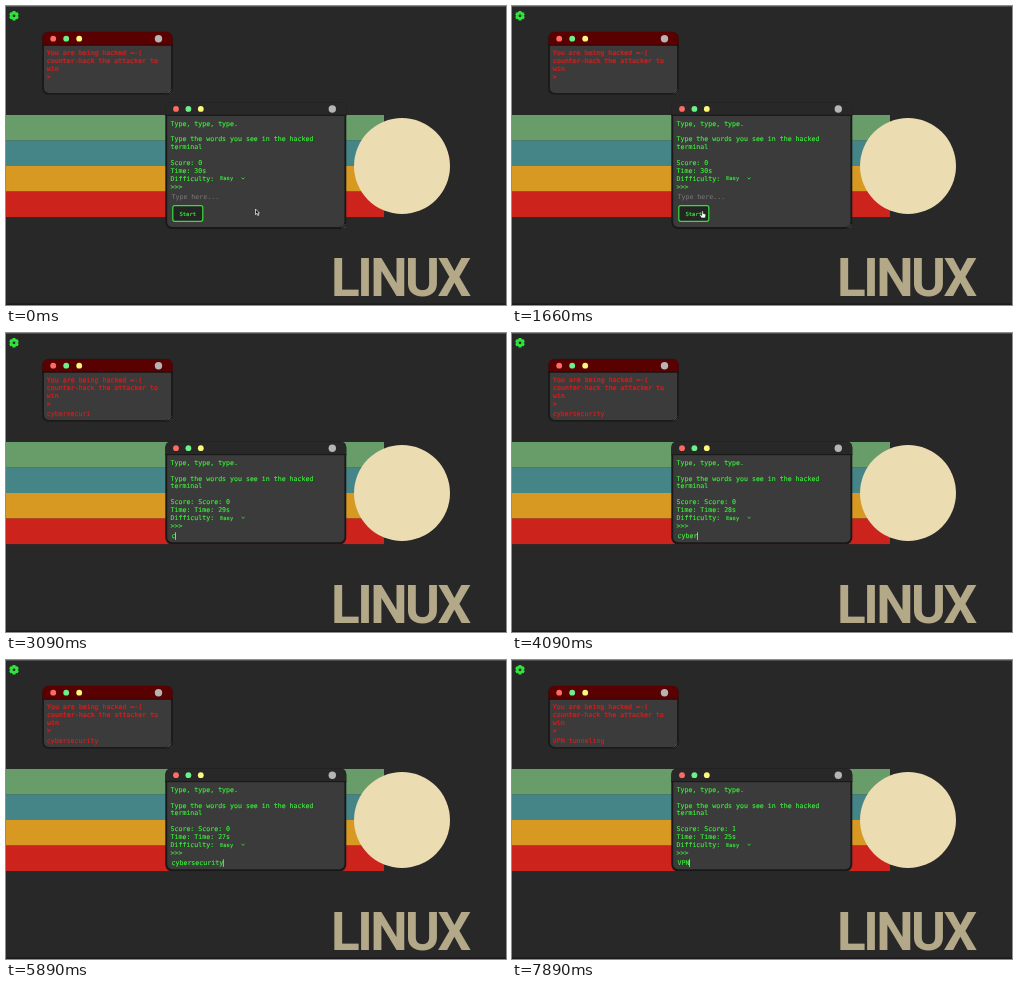
An HTML page for the animation above (8000 ms loop, 500 by 299 pixels).

```html
<!DOCTYPE html>
<html lang="en">
<head>
<meta charset="utf-8">
<title>Typing game</title>
<style>
  html, body { margin: 0; width: 100%; height: 100%; overflow: hidden; background: #282828; }
  svg { display: block; width: 100%; height: 100%; }
  text { font-family: "DejaVu Sans Mono", monospace; font-size: 6.6px; white-space: pre; }
  .green text { fill: #3bf53b; stroke: #3bf53b; stroke-width: .12; }
  .red text { fill: #e01a1a; stroke: #e01a1a; stroke-width: .15; }
  .green .hint { fill: #7b7b7b; stroke: none; }
  .small { font-size: 5.5px; }
  .soft { filter: blur(.45px); }
  .brand { font: 700 53px Roboto, sans-serif; letter-spacing: -2.5px; fill: #b3a888; }
</style>
</head>
<body>
<svg id="stage" viewBox="0 0 500 299"></svg>
<script>
const LOOP = 8000, START = 2000, SCORED = 5940, CHAR = 3.97;
const stage = document.getElementById('stage');

function add(parent, tag, attrs = {}, text = '') {
  const node = document.createElementNS('http://www.w3.org/2000/svg', tag);
  for (const key in attrs) node.setAttribute(key, attrs[key]);
  node.textContent = text;
  parent.append(node);
  return node;
}
const rect = (parent, x, y, width, height, fill, rx = 0) =>
  add(parent, 'rect', { x, y, width, height, fill, rx });
const dot = (parent, cx, cy, r, fill) => add(parent, 'circle', { cx, cy, r, fill });
const line = (parent, x, y, text, cls = '') => add(parent, 'text', { x, y, class: cls }, text);
const show = (node, on) => node.setAttribute('visibility', on ? 'visible' : 'hidden');
const move = (node, x, y) => node.setAttribute('transform', `translate(${x} ${y})`);

function grip(parent, x, y) {
  return add(parent, 'path', {
    d: `M${x - 4} ${y}l4 -4M${x - 1.7} ${y}l1.7 -1.7`, stroke: '#777', 'stroke-width': .5
  });
}

function titleBar(parent, x, y, w, fill, gap) {
  add(parent, 'path', {
    d: `M${x} ${y + 13}v-7q0 -6 6 -6h${w - 12}q6 0 6 6v7z`, fill
  });
  ['#ff6b62', '#6df089', '#fbf97c'].forEach((c, i) => dot(parent, x + 10.7 + i * gap, y + 6.7, 2.9, c));
  dot(parent, x + w - 14, y + 6.8, 3.7, '#b5b5b5');
}

// Wallpaper
rect(stage, 0, 0, 500, 299, '#282828');
const stripes = add(stage, 'g', { class: 'soft' });
['#689d6a', '#458588', '#d79921', '#cc241d'].forEach((c, i) =>
  rect(stripes, -5, 109 + i * 25.5, 383, 25.6, c));
rect(stage, 0, 0, 500, 1, '#4c4c4c');
rect(stage, 0, 297.5, 500, 1.5, '#1e191c');
dot(stage, 396, 160, 48, '#ebdcb2');
line(stage, 325, 289.5, 'LINUX', 'brand');

// Settings gear
const gear = add(stage, 'g', { transform: 'translate(8 9.8)' });
for (let i = 0; i < 3; i++) {
  rect(gear, -1.6, -4.8, 3.2, 9.6, '#2fe53a', .7).setAttribute('transform', `rotate(${i * 60})`);
}
dot(gear, 0, 0, 3.7, '#2fe53a');
dot(gear, 0, 0, 1.4, '#282828');

// Attack window
const attack = add(stage, 'g', { class: 'red' });
rect(attack, 36, 25.8, 131, 63, '#1b1b1b', 6.5);
rect(attack, 38, 34, 127, 53, '#3b3b3b', 5);
titleBar(attack, 36.5, 26, 130, '#590000', 13);
rect(attack, 36.5, 38.7, 130, 1, '#1f0a0a');
grip(attack, 165.5, 87.5);
const glitch = add(attack, 'g', { opacity: .9 });
const ghost = add(attack, 'g', { opacity: .5 });
for (const layer of [glitch, ghost]) {
  ['You are being hacked =-(', 'counter-hack the attacker to', 'win', '>']
    .forEach((s, i) => line(layer, 40.8, 49.3 + i * 7.8, s));
}
const target = line(attack, 40.8, 82.9, '');

// Game window
const game = add(stage, 'g', { class: 'green' });
const frame = rect(game, 159.3, 96, 181, 127, '#191919', 6.5);
const panel = rect(game, 161.2, 104, 177.2, 117, '#3b3b3b', 5);
titleBar(game, 159.3, 96.2, 181, '#282828', 12.4);
rect(game, 159.3, 108.7, 181, 1.2, '#191919');
line(game, 164.5, 119.8, 'Type, type, type.');
line(game, 164.5, 135.3, 'Type the words you see in the hacked');
line(game, 164.5, 143.2, 'terminal');
const score = line(game, 164.5, 158.8, '');
const time = line(game, 164.5, 166.7, '');
line(game, 164.5, 174.5, 'Difficulty:');
line(game, 214, 174.3, 'Easy', 'small');
add(game, 'path', { d: 'M235.6 171.7l1.5 1.4l1.5 -1.4', fill: 'none', stroke: '#3bf53b', 'stroke-width': .8 });
line(game, 164.5, 182.6, '>>>');
const hint = line(game, 165.5, 193, 'Type here...', 'hint');
const typed = line(game, 165.5, 193, '');
const caret = rect(game, 0, 187, .7, 7.6, '#e4e4e4');
const button = add(game, 'g');
add(button, 'rect', { x: 166.8, y: 199.7, width: 30, height: 15.6, rx: 2, fill: '#242424', stroke: '#35e035', 'stroke-width': 1.2 });
line(button, 173.5, 209.5, 'Start', 'small');
grip(button, 339.5, 222);

// Mouse pointers
const pen = { stroke: '#fff', 'stroke-width': .7, 'stroke-linejoin': 'round' };
const arrow = add(stage, 'path', { ...pen, d: 'M0 0v5.6l1.3 -1.2l1 2.2l1 -.5l-1 -2h1.6z', fill: '#111' });
const hand = add(stage, 'path', {
  d: 'M-.7 -3.2q.8 -.8 1.4 0v2.2l2 .5q.7 .3 .6 1.2l-.6 2.7h-3.6l-1.8 -2.4q0 -1 1 -.7l1 .7z',
  fill: '#fff', stroke: '#111', 'stroke-width': .5
});
const beam = add(stage, 'path', {
  d: 'M-1.3 -3.2q1.3 0 1.3 .8v4.8q0 .8 -1.3 .8M1.3 -3.2q-1.3 0 -1.3 .8v4.8q0 .8 1.3 .8',
  fill: 'none', stroke: '#ddd', 'stroke-width': .7
});

const words = ['cybersecurity', 'VPN tunneling'];
const keys = [
  [3090, 3290, 3490, 3690, 3890, 4690, 4890, 5200, 5330, 5460, 5590, 5720, 5850],
  [7290, 7490, 7690]
];
const noise = n => { const v = Math.sin(n * 91.7) * 4758.5; return v - Math.floor(v) - .5; };
const ease = p => p * p * (3 - 2 * p);

function draw(t) {
  const on = t >= START;
  const round = t < SCORED ? 0 : 1;
  const began = round ? SCORED : START;
  const tick = Math.floor((t + 110) / 200);

  move(glitch, noise(tick) * .4, noise(tick + 50) * .4);
  move(ghost, noise(tick + 100) * 1.2, noise(tick + 150) * .9);
  target.textContent = on ? words[round].slice(0, Math.floor((t - began) / 100) + 1) : '';

  move(game, 0, on ? 12.3 : 0);
  frame.setAttribute('height', on ? 103 : 127);
  panel.setAttribute('height', on ? 93 : 117);
  show(button, !on);
  score.textContent = on ? `Score: Score: ${round}` : 'Score: 0';
  time.textContent = on ? `Time: Time: ${30 - Math.floor((t - START) / 1000)}s` : 'Time: 30s';

  const count = keys[round].filter(k => k <= t).length;
  typed.textContent = words[round].slice(0, count);
  show(hint, !count);
  show(caret, on && (count > 0 || t % 1000 < 400));
  caret.setAttribute('x', 165.3 + count * CHAR);

  const p = ease(Math.min(1, Math.max(0, (t - 400) / 1000)));
  const x = 249.5 - 59 * p, y = 203 + 5.5 * p;
  const over = x < 197;
  move(arrow, x, y);
  move(hand, x, y);
  move(beam, 187.8, 205.2);
  show(arrow, !on && !over);
  show(hand, !on && over);
  show(beam, on && t < keys[0][0]);
}

const origin = performance.now();
function loop() {
  draw((performance.now() - origin) % LOOP);
  requestAnimationFrame(loop);
}
draw(0);
requestAnimationFrame(loop);
</script>
</body>
</html>
```
